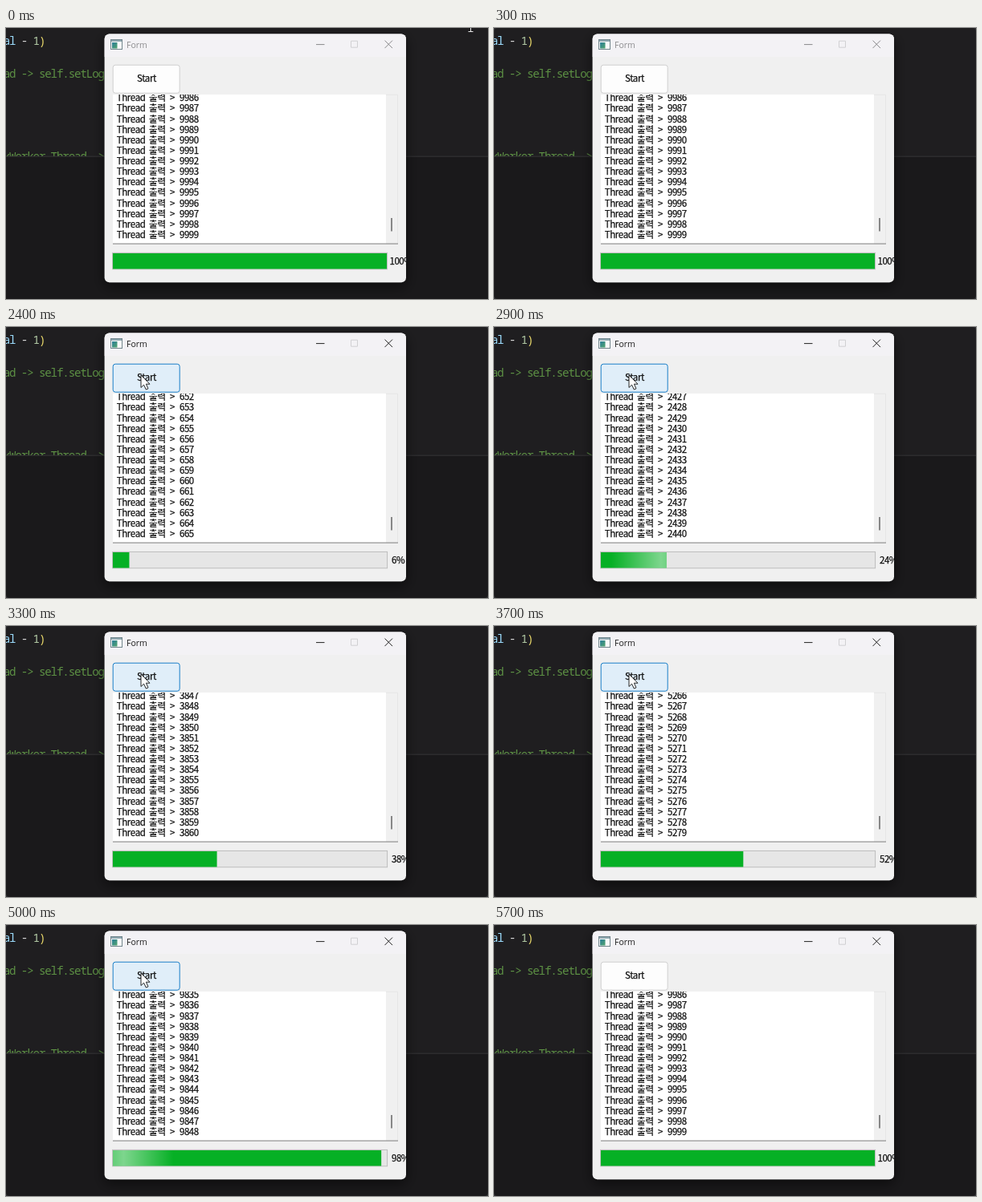
Write an HTML page that moves like this. It is 600 px wide and 338 px high and loops after 6000 ms.

```html
<!DOCTYPE html>
<html lang="ko">
<head>
<meta charset="utf-8">
<title>Form</title>
<style>
  html, body { margin: 0; width: 100%; height: 100%; overflow: hidden; background: #1a191b; }
  svg { display: block; width: 100vw; height: 100vh; }
  text { white-space: pre; }
  .code { font: 14.2px "Noto Sans Mono", monospace; letter-spacing: -1.15px; fill: #5d9144; }
  .ui { font: 11.5px "Noto Sans CJK KR", "Noto Sans CJK JP", sans-serif; fill: #111; stroke: #111; stroke-width: .25px; }
  .latin { letter-spacing: -.35px; }
  .num { letter-spacing: -.5px; }
  .title { font: 10.5px "Open Sans", sans-serif; }
</style>
</head>
<body>
<svg viewBox="0 0 600 338">
  <defs>
    <clipPath id="editorClip"><rect width="600" height="160"/></clipPath>
    <clipPath id="windowClip"><rect x="122.7" y="7.5" width="375.3" height="309.8" rx="6"/></clipPath>
    <clipPath id="logClip"><rect x="133" y="83" width="340" height="186"/></clipPath>
    <clipPath id="barClip"><rect id="barClipRect" x="133" y="281" height="19.5"/></clipPath>
    <linearGradient id="shine">
      <stop offset="0" stop-color="#fff" stop-opacity="0"/>
      <stop offset=".5" stop-color="#fff" stop-opacity=".48"/>
      <stop offset="1" stop-color="#fff" stop-opacity="0"/>
    </linearGradient>
    <linearGradient id="iconFill" x2="1" y2="1">
      <stop offset="0" stop-color="#2e7f9c"/>
      <stop offset="1" stop-color="#4fa36b"/>
    </linearGradient>
    <filter id="shadow" x="-15%" y="-15%" width="130%" height="135%">
      <feDropShadow dx="0" dy="5" stdDeviation="8" flood-color="#000" flood-opacity=".55"/>
    </filter>
  </defs>

  <rect width="600" height="338" fill="#1a191b"/>
  <rect width="600" height="160" fill="#1f1e20"/>
  <g class="code" clip-path="url(#editorClip)">
    <text x="-3.3" y="21"><tspan fill="#9cdcfe">al</tspan><tspan fill="#d4d4d4"> - </tspan><tspan fill="#b5cea8">1</tspan><tspan fill="#e8d86a">)</tspan></text>
    <text x="-3.3" y="62.3">ad -&gt; self.setLog</text>
    <text x="-3.3" y="165">kWorker Thread -&gt;</text>
  </g>
  <path d="M0 160.2H600" stroke="#363538"/>

  <rect x="122.7" y="7.5" width="375.3" height="309.8" rx="6" fill="#f0f0f0" filter="url(#shadow)"/>
  <g clip-path="url(#windowClip)">
    <rect x="122" y="7" width="376" height="29" fill="#f3f2f5"/>
    <rect x="130.5" y="14.5" width="14" height="12" fill="#fafafa" stroke="#71858c"/>
    <rect x="131" y="15" width="13" height="2" fill="#8fa8b0"/>
    <rect x="132" y="18" width="6.5" height="7.5" fill="url(#iconFill)"/>
    <text id="title" class="title" x="150" y="25">Form</text>
    <path d="M429.5 16.2h8v8h-8z" fill="none" stroke="#d0d0d2"/>
    <path id="controls" d="M386 20.6H396.5M471.5 15.6l9.5 9.5M481 15.6l-9.5 9.5" fill="none"/>

    <rect id="button" x="133.2" y="46.2" width="83" height="35" rx="3"/>
    <text class="ui latin" x="175" y="67" text-anchor="middle">Start</text>

    <rect x="133" y="83" width="340" height="186" fill="#fff"/>
    <path d="M473 83.2H487.5V269" fill="none" stroke="#e6e6e6"/>
    <path d="M133 269.1H488" stroke="#7d7d7d"/>
    <path d="M480 237V253.5" stroke="#6e6e6e" stroke-width="1.6"/>
    <g id="log" class="ui" clip-path="url(#logClip)"></g>

    <rect x="132.6" y="280.4" width="342" height="20.4" fill="#e6e6e6" stroke="#bcbcbc"/>
    <g clip-path="url(#barClip)">
      <rect x="133" y="280" width="342" height="21" fill="#06b025"/>
      <rect id="glow" y="280" width="124" height="21" fill="url(#shine)"/>
    </g>
    <text id="percent" class="ui num" y="294.7"></text>
  </g>

  <path id="beam" d="M575.5 4.5H581.5M578.5 4.5V-10" stroke="#e8e8e8" fill="none"/>
  <path id="arrow" d="M0 0V15.5L3.6 12.2L6.3 18L9 16.8L6.4 11.2H11Z" fill="#fff" stroke="#111" stroke-width=".9"/>
  <path id="corners" fill="#303033" fill-rule="evenodd"
        d="M0 0H600V338H0ZM5 0Q0 0 0 5V333Q0 338 5 338H595Q600 338 600 333V5Q600 0 595 0Z"/>
</svg>
<script>
const LOOP = 6000, STEP = 100, ROWS = 14, PITCH = 13.13;
const RUN = 2300, BAR = 341;
const GLOW_SPEED = .56, GLOW_PERIOD = 2210, GLOW_HALF = 62;
const $ = id => document.getElementById(id);
const set = (el, attrs) => { for (const k in attrs) el.setAttribute(k, attrs[k]); };
const show = (el, on) => set(el, { visibility: on ? "visible" : "hidden" });

function addText(x, y, str, cls = "") {
  const el = document.createElementNS("http://www.w3.org/2000/svg", "text");
  set(el, { x, y, class: cls });
  el.textContent = str;
  $("log").append(el);
  return el;
}

const numbers = Array.from({ length: ROWS }, (_, i) => {
  const y = 262 - (ROWS - 1 - i) * PITCH;
  addText(137.7, y, "Thread", "latin");
  addText(178, y, "출력");
  addText(204, y, ">");
  return addText(216, y, "", "num");
});

// Linear interpolation through rows of [time, ...values].
function track(keys, t) {
  if (t <= keys[0][0]) return keys[0].slice(1);
  for (let i = 1; i < keys.length; i++) {
    const a = keys[i - 1], b = keys[i];
    if (t <= b[0]) {
      const p = (t - a[0]) / (b[0] - a[0]);
      return a.slice(1).map((v, j) => v + (b[j + 1] - v) * p);
    }
  }
  return keys[keys.length - 1].slice(1);
}

const COUNT = [[2300, 310], [2900, 2440], [3700, 5279], [4300, 7346], [5000, 9848], [5042, 9999]];
const POINTER = [[1700, 193, -16], [1800, 187, 8], [1900, 180, 31], [2000, 172, 51],
  [2100, 168, 60], [5200, 168, 60], [5400, 165, 74], [5500, 163, 88]];

function glowCentre(t) {
  const sweep = t - 2900 - (t < 4800 ? 0 : GLOW_PERIOD);
  return 208 + GLOW_SPEED * sweep;
}

function draw(time) {
  const t = Math.floor(time / STEP) * STEP;
  const running = t >= RUN;
  const count = running ? Math.round(track(COUNT, t)[0]) : 9999;
  const pct = count === 9999 ? 100 : Math.floor(count / 100);

  numbers.forEach((el, i) => el.textContent = count - ROWS + 1 + i);
  $("percent").textContent = pct + "%";
  set($("percent"), { x: pct === 100 ? 477.5 : 480 });
  set($("barClipRect"), { width: BAR * pct / 100 });
  set($("glow"), { x: glowCentre(t) - GLOW_HALF });
  show($("glow"), running && t < 5700);

  const active = t >= 2200;
  set($("title"), { fill: active ? "#1b1b1b" : "#8c8c8e" });
  set($("controls"), { stroke: active ? "#222" : "#88888a" });

  const [x, y] = track(POINTER, t);
  const hover = t >= 2100 && y < 81;
  set($("button"), { fill: hover ? "#e0eef9" : "#fdfdfd", stroke: hover ? "#1a7fc8" : "#cfcfcf" });
  set($("arrow"), { transform: `translate(${x} ${y})` });
  show($("arrow"), t >= 1700 && y < 83);

  set($("beam"), { transform: `translate(0 ${-t * .03})` });
  show($("beam"), t < 200);
  set($("corners"), { opacity: Math.min(t / 300, 1) });
}

const start = performance.now();
function tick() {
  draw((performance.now() - start) % LOOP);
  requestAnimationFrame(tick);
}
tick();
</script>
</body>
</html>
```
